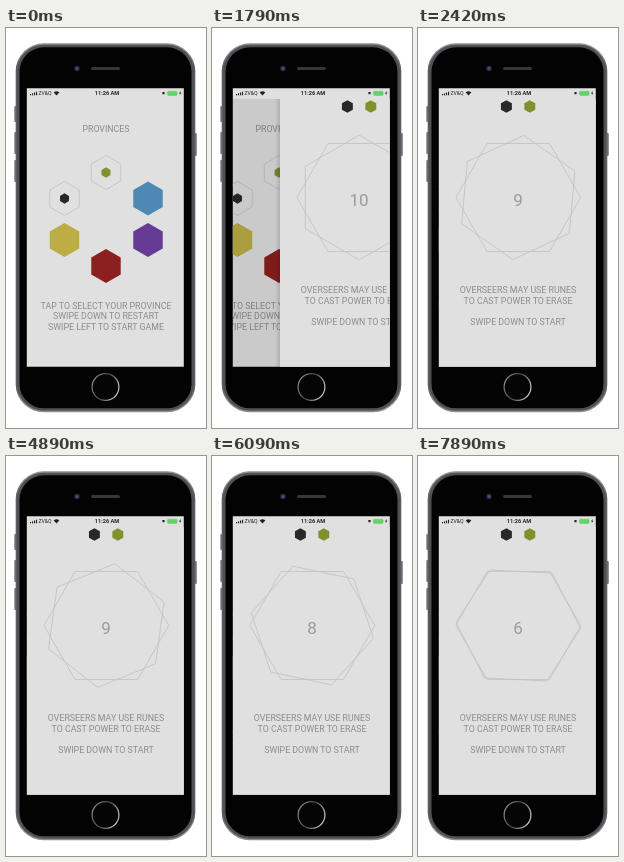
Animation of 200x400 px, one loop 7990 ms. Source, as an HTML page:

```html
<!DOCTYPE html>
<html lang="en">
<head>
<meta charset="utf-8">
<title>Hexagon game on a phone</title>
<style>
  html, body { margin: 0; width: 100%; height: 100%; overflow: hidden; background: #fff; }
  svg { display: block; width: 200px; height: 400px; }
  text { font-family: Roboto, "Liberation Sans", sans-serif; text-anchor: middle; }
  .copy { font-size: 8.8px; fill: #8c8c8e; }
  .bar { font-size: 5.6px; fill: #222; }
  .line { fill: none; stroke: #c3c3c5; stroke-width: .9; }
</style>
</head>
<body>
<svg viewBox="0 0 200 400">
  <defs>
    <clipPath id="screen"><rect x="20.8" y="60.3" width="157" height="278.4"/></clipPath>
    <linearGradient id="edge">
      <stop offset="0" stop-color="#55565a"/>
      <stop offset=".03" stop-color="#8d8e92"/>
      <stop offset=".97" stop-color="#8d8e92"/>
      <stop offset="1" stop-color="#55565a"/>
    </linearGradient>
    <linearGradient id="shade">
      <stop offset="0" stop-color="#000" stop-opacity="0"/>
      <stop offset="1" stop-color="#000" stop-opacity=".13"/>
    </linearGradient>
    <linearGradient id="ring" x1="0" y1=".3" x2="1" y2=".7">
      <stop offset="0" stop-color="#8a8a8a"/>
      <stop offset=".45" stop-color="#444"/>
      <stop offset="1" stop-color="#d0d0d0"/>
    </linearGradient>
  </defs>

  <!-- phone -->
  <g fill="#77787c">
    <rect x="8.3" y="78" width="3" height="16" rx="1"/>
    <rect x="8.3" y="104" width="3" height="22" rx="1"/>
    <rect x="8.3" y="132" width="3" height="22" rx="1"/>
    <rect x="187.8" y="105" width="3" height="23" rx="1"/>
  </g>
  <rect x="9.7" y="15.3" width="179.6" height="369" rx="28" fill="url(#edge)"/>
  <rect x="11" y="16.8" width="177" height="366" rx="26.5" fill="#505155"/>
  <rect x="13.5" y="19.3" width="172" height="361" rx="24.5" fill="#030303"/>
  <circle cx="71" cy="40.5" r="2.7" fill="#2c2e3c"/>
  <circle cx="71" cy="40.5" r="1.2" fill="#4c5290"/>
  <rect x="85" y="39" width="29" height="3" rx="1.5" fill="#37373a"/>
  <circle cx="99.5" cy="359" r="13.4" fill="#050505" stroke="url(#ring)" stroke-width="1.2"/>

  <g clip-path="url(#screen)">
    <rect x="20" y="60" width="159" height="279" fill="#e0e0e1"/>
    <g id="menu">
      <text class="copy" x="100" y="104">PROVINCES</text>
      <g id="tiles"></g>
      <text class="copy" x="100" y="280.7">TAP TO SELECT YOUR PROVINCE</text>
      <text class="copy" x="100" y="291.4">SWIPE DOWN TO RESTART</text>
      <text class="copy" x="100" y="302.2">SWIPE LEFT TO START GAME</text>
    </g>
    <rect id="dim" x="20" y="71" width="159" height="268" fill="#000"/>
    <g id="game">
      <rect x="16" y="71" width="5" height="268" fill="url(#shade)"/>
      <rect x="21" y="71" width="158" height="268" fill="#e0e0e1"/>
      <g id="badges"></g>
      <polygon id="frame" class="line"/>
      <polygon id="spinner" class="line"/>
      <text id="count" x="100" y="178.2" font-size="17" fill="#9c9c9e"></text>
      <text class="copy" x="100" y="265.3">OVERSEERS MAY USE RUNES</text>
      <text class="copy" x="100" y="276">TO CAST POWER TO ERASE</text>
      <text class="copy" x="100" y="297">SWIPE DOWN TO START</text>
    </g>

    <!-- status bar -->
    <g fill="#222">
      <rect x="24" y="66" width="1.1" height="1.3"/>
      <rect x="26" y="65.3" width="1.1" height="2"/>
      <rect x="28" y="64.5" width="1.1" height="2.8"/>
      <rect x="30" y="63.7" width="1.1" height="3.6"/>
      <path d="M47.7 64.6Q50.5 62 53.3 64.6L50.5 67.6Z"/>
      <rect x="156.4" y="64" width="2.2" height="2.2"/>
      <path d="M174.6 62.8L173 65.4H174.2L173.6 67.4L175.4 64.7H174.3Z"/>
    </g>
    <text class="bar" x="39" y="67.3" style="font-size:5.2px">ZV&amp;Q</text>
    <text class="bar" x="101" y="67.3" font-weight="bold">11:26 AM</text>
    <rect x="161.5" y="63.2" width="9.6" height="4.2" rx="1" fill="#5fd763" stroke="#79a97b" stroke-width=".4"/>
  </g>
</svg>

<script>
const LOOP = 7990;
const PAGE = 157;
const $ = id => document.getElementById(id);

function hexPoints(cx, cy, r, deg) {
  return Array.from({ length: 6 }, (_, i) => {
    const a = (deg + i * 60) * Math.PI / 180;
    return (cx + r * Math.cos(a)).toFixed(2) + "," + (cy + r * Math.sin(a)).toFixed(2);
  }).join(" ");
}

function addHex(parent, cx, cy, r, fill) {
  const p = document.createElementNS("http://www.w3.org/2000/svg", "polygon");
  p.setAttribute("points", hexPoints(cx, cy, r, 30));
  if (fill) p.setAttribute("fill", fill);
  else p.setAttribute("class", "line");
  parent.append(p);
}

const ringPoints = deg => hexPoints(100.3, 169.5, 62.4, deg);

const olive = "#80922c", black = "#272829";
for (const [x, y, color, small] of [
  [100, 144.5, olive, true], [142, 170.5, "#4c88b1"], [142, 212, "#653b95"],
  [100, 238, "#8c1f1f"], [58.5, 212, "#bcae45"], [58.5, 170.5, black, true]
]) {
  if (small) addHex($("tiles"), x, y, 17);
  addHex($("tiles"), x, y, small ? 5.2 : 17, color);
}
addHex($("badges"), 88.4, 78.5, 6.3, black);
addHex($("badges"), 111.8, 78.5, 6.3, olive);
$("frame").setAttribute("points", ringPoints(0));

// Distance the second page has been pulled in
function pulled(t) {
  if (t < 30) return 0;
  if (t < 130) return 6;
  if (t < 160) return 15;
  if (t < 1790) return 20;
  if (t >= 2420) return PAGE;
  const step = Math.floor((t - 1790) / 100) * 100;
  return PAGE - 47 * Math.exp(-step / 130);
}

// Seconds since the countdown began; negative before it starts
function running(t) {
  if (t < 2420) return (t - 2240) / 1000;
  if (t < 4890) return 0.18;
  return 0.28 + Math.floor((t - 4890) / 100) / 10;
}

function draw(t) {
  const d = pulled(t), s = running(t);
  $("menu").setAttribute("transform", `translate(${-0.3 * d} 0)`);
  $("dim").setAttribute("opacity", 0.14 * d / PAGE);
  $("game").setAttribute("transform", `translate(${PAGE - d} 0)`);
  $("game").setAttribute("visibility", d ? "visible" : "hidden");
  $("spinner").setAttribute("points", ringPoints(30 + 28.3 * Math.max(0, s)));
  $("count").textContent = s < 0 ? 10 : 9 - Math.floor(s);
}

const start = performance.now();
function tick() {
  draw((performance.now() - start) % LOOP);
  requestAnimationFrame(tick);
}
tick();
</script>
</body>
</html>
```
